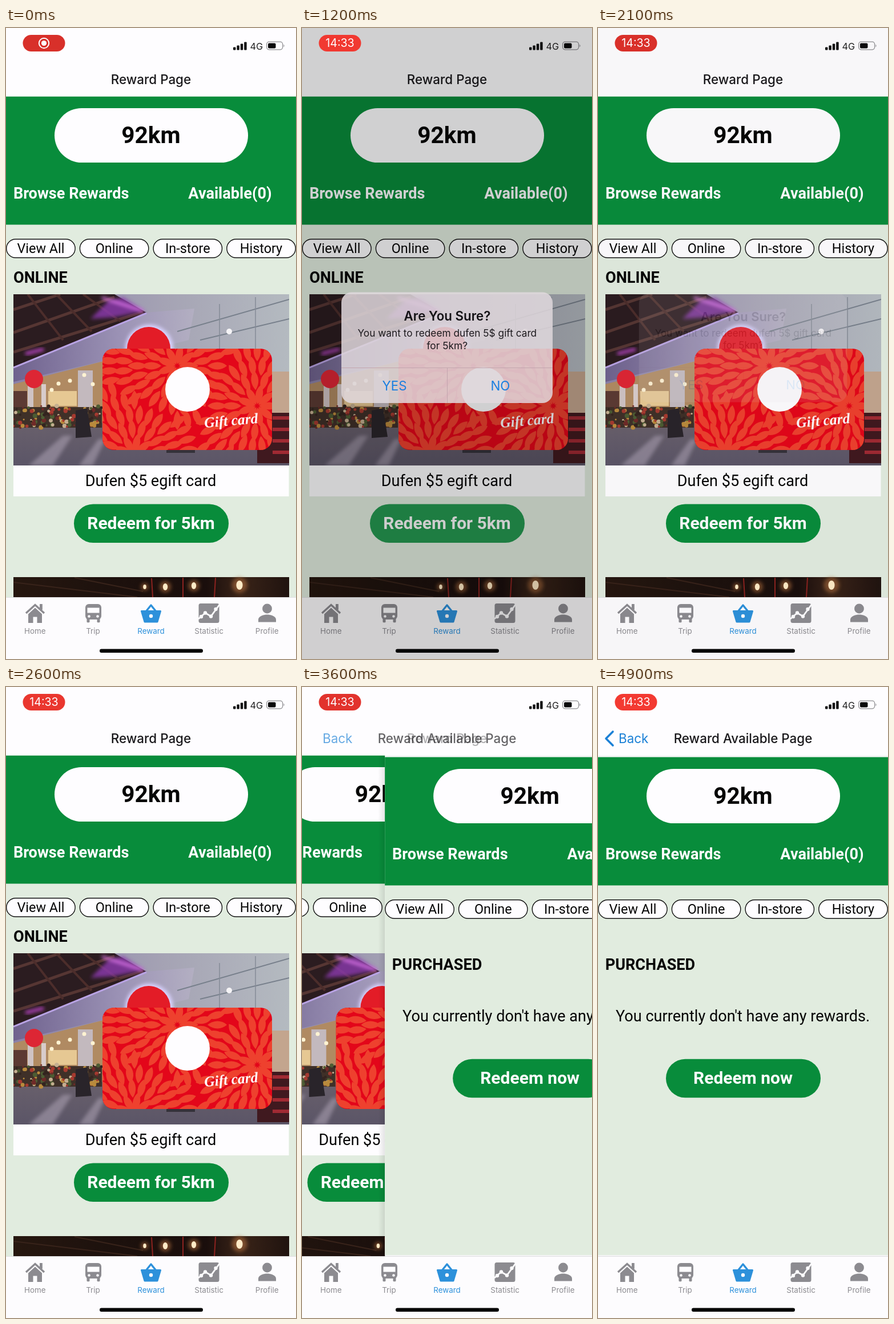
Write an HTML page that moves like this. It is 508x1102 px and loops after 5 s.

```html
<!DOCTYPE html>
<html lang="en">
<head>
<meta charset="utf-8">
<title>Reward page</title>
<style>
  html, body { margin: 0; width: 100%; height: 100%; overflow: hidden; background: #fefdff; }
  svg { display: block; width: 100%; height: 100%; }
  .r { font-family: Roboto, sans-serif; }
  .i { font-family: Inter, sans-serif; }
  .b { font-weight: 700; }
  .m { text-anchor: middle; }
</style>
</head>
<body>
<svg id="stage" viewBox="0 0 508 1102" xmlns="http://www.w3.org/2000/svg"></svg>
<script>
const GREEN = '#088c3b', WHITE = '#fefdff', MINT = '#e1ecdf', GREY = '#8c8b90', BLUE = '#2d91db';

const rect = (x, y, w, h, fill, r = 0, more = '') =>
  `<rect x="${x}" y="${y}" width="${w}" height="${h}" rx="${r}" fill="${fill}" ${more}/>`;
const disc = (x, y, r, fill, more = '') => `<circle cx="${x}" cy="${y}" r="${r}" fill="${fill}" ${more}/>`;
const poly = (points, fill, more = '') => `<polygon points="${points}" fill="${fill}" ${more}/>`;
const path = (d, fill, more = '') => `<path d="${d}" fill="${fill}" ${more}/>`;
const line = (d, stroke, width, more = '') => path(d, 'none', `stroke="${stroke}" stroke-width="${width}" ${more}`);
const text = (s, x, y, size, cls, fill = '#060606', more = '') =>
  `<text x="${x}" y="${y}" font-size="${size}" class="${cls}" fill="${fill}" ${more}>${s}</text>`;
const group = (id, body, more = '') => `<g id="${id}" ${more}>${body}</g>`;
const SOFT = 'filter="url(#soft)"';

let seed = 7;
const rand = () => (seed = seed * 16807 % 2147483647) / 2147483647;

// Green summary panel and filter pills shared by both pages
function summary(top) {
  const pills = ['View All', 'Online', 'In-store', 'History'].map((label, i) => {
    const x = 0.7 + i * 128.7;
    return rect(x, top + 248.7, 120.4, 32.6, WHITE, 16.3, 'stroke="#111" stroke-width="1.4"') +
      text(label, x + 60.2, top + 272.6, 23.4, 'r m');
  });
  return rect(0, top - .5, 508, 224, GREEN) +
    rect(85, top + 20, 339, 95, WHITE, 47.5) +
    text('92km', 254, top + 81, 40.6, 'r b m') +
    text('Browse Rewards', 12.9, top + 178, 27.1, 'r b', WHITE) +
    text('Available(0)', 319.3, top + 178, 27.1, 'r b', WHITE) +
    pills.join('');
}

const button = (label, y) => rect(119, y, 271, 67.5, GREEN, 33.75) + text(label, 254, y + 43.6, 30, 'r b m', WHITE);

function flowers() {
  const colours = ['#a63a30', '#b98a3c', '#4d5c33', '#c4ae90', '#33241f', '#6f2a28'];
  let out = '';
  for (let i = 0; i < 110; i++) {
    out += disc((13 + rand() * 155).toFixed(1), (660 + rand() * 38).toFixed(1), (1.5 + rand() * 2.5).toFixed(1), colours[i % 6]);
  }
  return out;
}

// Rosettes of leaves around three centres, each leaf kept by its nearest centre
function leaves() {
  const hubs = [[225, 745], [300, 590], [440, 660]];
  const leaf = 'M0-17C9-7 8 7 0 17C-8 7-9-7 0-17Z';
  let out = '';
  hubs.forEach(([hx, hy]) => {
    for (let ring = 0; ring < 6; ring++) {
      const radius = 20 + ring * 25, count = Math.round(radius * .34) + 2;
      for (let k = 0; k < count; k++) {
        const a = (k + ring % 2 / 2) / count * 2 * Math.PI;
        const x = hx + radius * Math.cos(a), y = hy + radius * Math.sin(a);
        const own = hubs.every(([ox, oy]) => Math.hypot(x - ox, y - oy) >= radius - 1);
        if (own) out += path(leaf, '#ee412e', `transform="translate(${x.toFixed(1)} ${y.toFixed(1)}) rotate(${(a * 180 / Math.PI + 90).toFixed(0)})"`);
      }
    }
  });
  return out;
}

function shop() {
  const beams = line('M13 492L95 465M13 532L190 470M13 566L240 496', '#563633', 5) +
    line('M38 465L100 545M88 465L150 530M135 465L200 512', '#4c2d2b', 4);
  const rails = line('M300 530L496 474M340 545L496 508', '#78808c', 2) + line('M374 482V560M437 470V560', '#848b96', 1.5);
  const lamps = [[92, 621], [112, 616], [80, 632], [137, 606], [152, 622]].map(p => disc(...p, 3.5, '#fff3d2')).join('');
  return rect(13, 465, 483, 299, 'url(#wall)') +
    poly('13,465 190,465 246,497 13,592', '#2b1c20') + beams +
    path('M148 508L180 476L205 470L243 495L190 505Z', '#8d3bb0', `opacity=".8" ${SOFT}`) +
    line('M168 471L240 494', '#e57bef', 4, SOFT) +
    line('M34 569L66 561', '#c046cf', 5, SOFT) +
    poly('13,592 246,497 330,490 320,545 160,584 13,618', 'url(#fascia)') +
    line('M13 593L246 498', '#b9a3e4', 3) + rails +
    poly('13,622 170,582 170,700 13,706', '#b08a62') +
    rect(13, 634, 24, 36, '#5c3a33') + rect(74, 634, 50, 26, '#e6c893') +
    rect(38, 624, 10, 50, '#cfc3c4') + rect(62, 622, 8, 52, '#d8cccb') +
    rect(126, 598, 26, 88, '#c3b9be') + lamps +
    poly('13,692 496,684 496,764 13,764', 'url(#floor)') +
    path('M40 764L100 712L116 712L82 764ZM128 764L162 718L174 718L152 764Z', '#a79dae', `opacity=".6" ${SOFT}`) +
    rect(13, 662, 155, 36, '#3f3028') + flowers() +
    poly('122,668 142,664 150,714 122,716', '#29242a') +
    rect(464, 600, 32, 74, '#c3a58e') + rect(440, 672, 56, 88, '#40191f') +
    [0, 1, 2, 3].map(i => rect(467, 678 + i * 20, 29, 6, '#a02a33')).join('') +
    rect(281, 735, 50, 7, '#35323a') +
    disc(391, 530, 5, '#f5f4f6') +
    disc(251, 560, 42, '#d9d3ff', SOFT) + disc(250, 560, 38, '#e31c27') +
    disc(49, 613, 16, '#dd2634') +
    `<g clip-path="url(#card)">${rect(169, 560, 297, 177, '#e3061a')}${leaves()}</g>` +
    disc(318, 631, 39, WHITE) +
    text('Gift card', 348, 698, 25.5, 'b', WHITE, 'font-style="italic" font-family="Liberation Serif, serif" transform="rotate(-5 348 698)"');
}

function bar() {
  const lamps = [[243, 976, 4], [279, 976, 6], [329, 974, 6], [409, 973, 8]].map(([x, y, r]) =>
    disc(x, y, r * 1.7, '#a8693a', `opacity=".6" ${SOFT}`) + `<ellipse cx="${x}" cy="${y}" rx="${r * .7}" ry="${r}" fill="#ffeac6"/>`);
  return rect(13, 959, 483, 36, 'url(#night)') +
    line('M13 968L230 994M120 960L240 984', '#38231a', 2) +
    line('M255 961L257 994M310 960V994M367 960L365 994', '#8d2320', 2) + lamps.join('');
}

const home = rect(0, 119, 508, 876, MINT) + summary(120) +
  text('ONLINE', 13, 445, 27.1, 'r b') +
  `<g clip-path="url(#photo)">${shop()}</g>` +
  rect(13, 764, 482.5, 54, WHITE) +
  text('Dufen $5 egift card', 253.5, 799.6, 27.1, 'r m') +
  group('redeem', button('Redeem for 5km', 831.5)) + bar();

const empty = rect(-12, 120, 12, 875, 'url(#edge)') +
  rect(0, 119, 508, 876, '#f4f5f5') + rect(0, 123, 508, 869, MINT) + summary(123) +
  text('PURCHASED', 12.7, 493.6, 27.1, 'r b') +
  text("You currently don't have any rewards.", 253.5, 583.7, 27.1, 'r m') +
  button('Redeem now', 649.7);

const header = rect(0, 0, 508, 119.5, WHITE) +
  text('Reward Page', 254, 97.5, 22.4, 'i m', '#1a191c', 'id="titleA" font-weight="500"') +
  text('Reward Available Page', 254, 97.5, 22.4, 'i m', '#1a191c', 'id="titleB" font-weight="500"') +
  text('Back', 36, 98, 22.4, 'i', '#1b80d6', 'id="back"') +
  line('M26 78L14 90L26 102', '#1b80d6', 3.6, 'id="chevron" stroke-linecap="round" stroke-linejoin="round"');

const status = [0, 1, 2, 3].map(i => rect(398 + i * 6.4, 33.5 - i * 3, 4.4, 5 + i * 3, '#0b0b0c', 1)).join('') +
  text('4G', 427.5, 38, 16.2, 'i', '#222') +
  rect(456.6, 24.2, 28, 13.6, 'none', 4.2, 'stroke="#8f8f92" stroke-width="1.3"') +
  rect(459, 26.6, 13.5, 8.8, '#0b0b0c', 2) + path('M486.3 28.5q2.6 2.5 0 5Z', '#8f8f92');

function tabs() {
  const icons =
    line('M35 1022L51 1007.5L67 1022', GREY, 3.4) + rect(59, 1006, 4.8, 10, GREY) +
    path('M39 1023.5L51 1012.5L63 1023.5V1039H54.5V1028.5H47.5V1039H39Z', GREY) +
    rect(139, 1006, 28, 27, GREY, 6) + rect(142.5, 1012.5, 21, 9, WHITE) +
    disc(145.5, 1027.5, 2.3, WHITE) + disc(160.5, 1027.5, 2.3, WHITE) +
    rect(141.5, 1030, 5, 8.3, GREY, 1.5) + rect(159.5, 1030, 5, 8.3, GREY, 1.5) +
    line('M245.5 1018.5L254 1008L262.5 1018.5', BLUE, 3.4, 'stroke-linejoin="round"') +
    path('M237.5 1018.5H270.5L265 1037H243Z', BLUE, `stroke="${BLUE}" stroke-width="3" stroke-linejoin="round"`) +
    disc(254, 1027, 3.2, WHITE) +
    rect(337.5, 1005, 36, 34, GREY, 3.5) +
    line('M337 1032L349 1021.5L359 1027.5L374 1007', WHITE, 2.8) +
    [[342, 1028], [349, 1021.5], [359, 1027.5], [367.5, 1015]].map(p => disc(...p, 3.2, WHITE)).join('') +
    disc(457.5, 1014, 8.4, GREY) +
    path('M442 1037.5V1033C442 1027 452 1024.5 457.5 1024.5S473 1027 473 1033V1037.5Z', GREY);
  const labels = ['Home', 'Trip', 'Reward', 'Statistic', 'Profile'].map((s, i) =>
    text(s, 50.8 + i * 101.6, 1057.6, 13.4, 'i m', i === 2 ? BLUE : GREY));
  return rect(0, 994, 508, 108, '#fdfcfe') + rect(0, 994, 508, 1, '#e0dfe2') + icons + labels.join('') +
    rect(164, 1084.5, 181, 6.4, '#050505', 3.2);
}

const dialog = rect(69, 461.5, 370, 193.5, '#e2dadf', 18, 'fill-opacity=".85"') +
  text('Are You Sure?', 254.5, 511, 22.3, 'i m', '#141216', 'font-weight="600"') +
  text('You want to redeem dufen 5$ gift card', 254.3, 538.6, 17.3, 'i m', '#1d1a1e') +
  text('for 5km?', 254.3, 560.5, 17.4, 'i m', '#1d1a1e') +
  line('M69 593.5H439M254.5 593.5V655', '#c3a5ae', 1) +
  text('YES', 162, 632.6, 22.4, 'i m', '#1b7fe0') +
  text('NO', 347.5, 632.6, 22.4, 'i m', '#1b7fe0');

const pill = rect(29.5, 12, 74, 29, '#f43a32', 14.5, 'id="pillBack"') +
  group('record', disc(66.5, 26.5, 8.7, 'none', `stroke="${WHITE}" stroke-width="2"`) + disc(66.5, 26.5, 4.6, WHITE)) +
  text('14:33', 66.5, 33.4, 19.6, 'i m', WHITE, 'id="clock"');

const stops = (...list) => list.map(([o, c, a = 1]) => `<stop offset="${o}" stop-color="${c}" stop-opacity="${a}"/>`).join('');
const defs = `<defs>
  <clipPath id="photo">${rect(13, 465, 483, 299, '#000')}</clipPath>
  <clipPath id="card">${rect(169, 560, 297, 177, '#000', 20)}</clipPath>
  <filter id="soft" x="-50%" y="-50%" width="200%" height="200%"><feGaussianBlur stdDeviation="3"/></filter>
  <linearGradient id="wall">${stops([0, '#8a80a8'], [.55, '#a5a3b4'], [1, '#b4bac0'])}</linearGradient>
  <linearGradient id="fascia">${stops([0, '#6f628e'], [.6, '#9c93b6'], [1, '#b3afc2'])}</linearGradient>
  <linearGradient id="floor" x2="0" y2="1">${stops([0, '#6a616c'], [1, '#5b5567'])}</linearGradient>
  <linearGradient id="night">${stops([0, '#26170f'], [.35, '#1d110d'], [.7, '#1a0e0c'], [.82, '#3a2418'], [1, '#20130f'])}</linearGradient>
  <linearGradient id="edge">${stops([0, '#000', 0], [1, '#000', .1])}</linearGradient>
</defs>`;

document.getElementById('stage').innerHTML = defs + group('pageA', home) + group('pageB', empty) +
  header + status + tabs() + rect(0, 0, 508, 1102, '#000', 0, 'id="dim"') + group('dialog', dialog) + pill;

const part = {};
['pageA', 'pageB', 'redeem', 'titleA', 'titleB', 'back', 'chevron', 'dim', 'dialog', 'pillBack', 'record', 'clock']
  .forEach(id => part[id] = document.getElementById(id));

const ramp = (t, from, to) => Math.min(1, Math.max(0, (t - from) / (to - from)));
const easeOut = p => 1 - (1 - p) ** 3;
const fade = (id, v) => part[id].setAttribute('opacity', v.toFixed(3));
const move = (id, v) => part[id].setAttribute('transform', v);

function draw(t) {
  const glow = .5 - .5 * Math.cos(t * Math.PI / 1000);
  part.pillBack.setAttribute('fill', `rgb(${216 + 28 * glow},${48 + 10 * glow},${42 + 8 * glow})`);
  const time = ramp(t, 250, 450);
  fade('record', 1 - time);
  fade('clock', time);

  fade('redeem', 1 - .8 * (ramp(t, 700, 850) - ramp(t, 950, 1250)));

  const shown = easeOut(ramp(t, 850, 1200)), gone = easeOut(ramp(t, 1900, 2300));
  const alert = shown * (1 - gone);
  fade('dim', .18 * alert);
  fade('dialog', alert);
  const scale = 1 + .12 * (1 - shown) - .017 * gone;
  move('dialog', `translate(254 558) scale(${scale}) translate(-254 -558)`);

  // Critically damped push
  const s = Math.max(0, t - 3400) * .0127;
  const push = t >= 4200 ? 1 : 1 - (1 + s) * Math.exp(-s);
  move('pageA', `translate(${-152 * push} 0)`);
  move('pageB', `translate(${520 * (1 - push)} 0)`);
  const swap = ramp(t, 3400, 3700);
  fade('titleA', 1 - swap);
  fade('titleB', swap);
  fade('back', swap);
  fade('chevron', ramp(t, 3800, 4000));
}

// The picture advances ten times a second
const start = performance.now();
function tick() {
  const t = (performance.now() - start) % 5000;
  draw(Math.floor(t / 100) * 100);
  requestAnimationFrame(tick);
}
draw(0);
requestAnimationFrame(tick);
</script>
</body>
</html>
```
